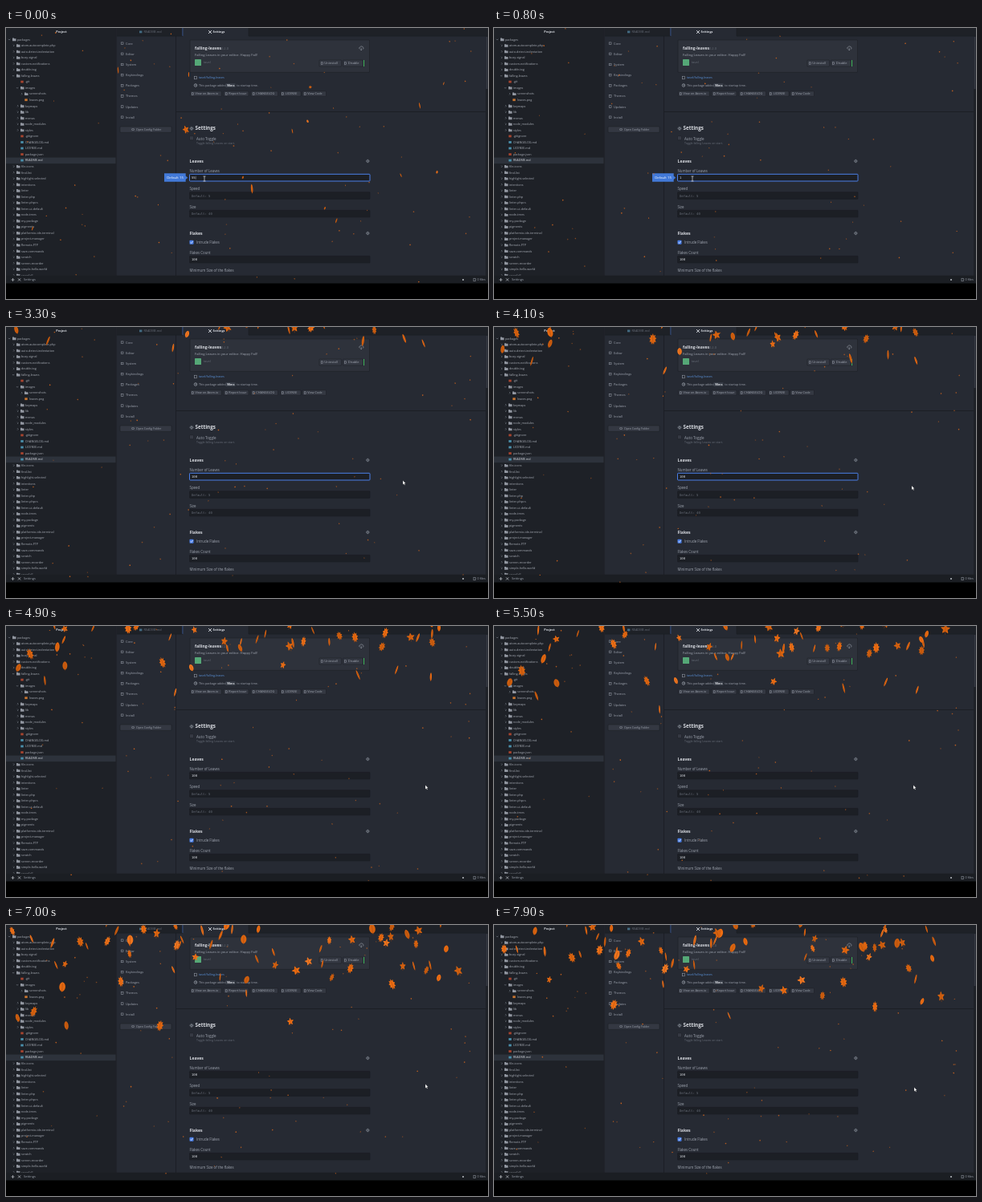
An HTML page with a canvas that plays this animation: 600 px wide and 338 px high, repeating every 8 s.

```html
<!DOCTYPE html>
<html lang="en">
<head>
<meta charset="utf-8">
<title>Falling leaves</title>
<style>
html, body { margin: 0; width: 100%; height: 100%; overflow: hidden; background: #000; }
svg, canvas { position: absolute; left: 0; top: 0; width: 600px; height: 338px; }
text { font-family: "Open Sans", "Noto Sans", sans-serif; white-space: pre; }
.mono { font-family: "DejaVu Sans Mono", monospace; }
.bold { font-weight: 700; }
</style>
</head>
<body>
<svg id="ui" viewBox="0 0 600 338"></svg>
<canvas id="fall" width="600" height="338"></canvas>
<svg id="pointer" viewBox="0 0 600 338">
  <path id="beam" d="M-1.5-3h3M0-3v6M-1.5 3h3" stroke="#d8dbe0" stroke-width=".7"/>
  <path id="arrow" d="M-1-2.5v5l1.2-1.1.9 1.8.8-.4-.9-1.8h1.5z" fill="#fff" stroke="#222" stroke-width=".2"/>
</svg>
<script>
const $ = id => document.getElementById(id);
const LOOP = 8000, FLOOR = 318.5;
const MAIN = '#262a33', SIDE = '#1e2127', EDGE = '#1a1c22', FIELD = '#1c1f25';
const TEXT = '#a0a6b1', DIM = '#686e79', BRIGHT = '#d9dce2', BLUE = '#4a7fe8';

// ---- Editor window ----
let out = '';
const rect = (x, y, w, h, fill, more = '') =>
  out += `<rect x="${x}" y="${y}" width="${w}" height="${h}" fill="${fill}" ${more}/>`;
// y is the middle of the line
const label = (x, y, s, size = 4.2, fill = TEXT, more = '') =>
  out += `<text x="${x}" y="${y + size * .36}" font-size="${size}" fill="${fill}" ${more}>${s}</text>`;
const line = (d, color = TEXT, width = .6, more = '') =>
  out += `<path d="${d}" fill="none" stroke="${color}" stroke-width="${width}" ${more}/>`;
const ring = (x, y, r, color = TEXT, more = '') =>
  out += `<circle cx="${x}" cy="${y}" r="${r}" fill="none" stroke="${color}" stroke-width=".7" ${more}/>`;
const icon = (x, y, w = 2, h = 2.4) =>
  rect(x, y - h / 2, w, h, 'none', `stroke="${TEXT}" stroke-width=".5"`);
const bold = 'class="bold"', mono = 'class="mono"';

const panel = (x, y, w, h, fill) =>
  rect(x, y, w, h, fill, `rx=".8" stroke="${EDGE}" stroke-width=".5"`);
const button = (x, y, w, h, s, size = 3.8) => {
  panel(x, y, w, h, '#343842');
  icon(x + 2.2, y + h / 2);
  label(x + 6.3, y + h / 2, s, size);
};

rect(0, 0, 600, 309, MAIN);
rect(0, 0, 136.5, 309, SIDE);
rect(136.5, 0, 1, 309, EDGE);
rect(138, 0, 462, 10, SIDE);
rect(220, 0, 82, 10, MAIN);
rect(219.5, 0, .8, 10, '#3c5c9e');
line('M138 10.2H220M302 10.2H600M302 0V10', EDGE);
label(69, 5, 'Project', 3.8, BRIGHT, `${bold} text-anchor="middle"`);
rect(166, 3.5, 3.4, 2.8, '#426b82');
label(171.5, 5, 'README.md', 3.8, DIM);
line('M252 3l4 4M256 3l-4 4', BRIGHT, .9);
label(257.5, 5, 'Settings', 3.7, BRIGHT, bold);

// Project tree: leading spaces give the depth
const tree = `packages
 atom-autocomplete-php
 auto-detect-indentation
 busy-signal
 custom-notifications
 double-tag
 falling-leaves
  .git
  images
   screenshots
   leaves.png
  keymaps
  lib
  menus
  node_modules
  styles
  .gitignore
  CHANGELOG.md
  LICENSE.md
  package.json
  README.md
 file-icons
 find-list
 highlight-selected
 intentions
 linter
 linter-php
 linter-phpcs
 linter-ui-default
 node-trees
 my-package
 pigments
 platformio-ide-terminal
 project-manager
 Remote-FTP
 save-commands
 scratch
 screen-recorder
 simple-hello-world
 snowfall`.split('\n');
const opened = ['packages', 'falling-leaves', 'images'];
const iconColor = name => /git|json/.test(name) ? '#a8452f' : /md$/.test(name) ? '#4b91ad'
  : /png/.test(name) ? '#c8752f' : '#9297a1';

rect(0, 161.5, 136.5, 7.6, '#2d323b');
tree.forEach((row, i) => {
  const name = row.trim(), x = 4 + 5 * (row.length - name.length), y = 14.3 + 7.54 * i;
  const isFile = name.includes('.'), color = iconColor(name);
  if (!isFile) line(opened.includes(name) ? `M${x - 1} ${y - .5}l1.1 1.2 1.1-1.2`
    : `M${x} ${y - 1.2}l1.2 1.2-1.2 1.2`, '#898f99', .55);
  if (isFile) rect(x + 4.3, y - 1.4, 3.4, 2.8, color);
  else out += `<path d="M${x + 4} ${y - 1.7}h1.8l.5.7h2.2v2.9h-4.5z" fill="${color}"/>`;
  label(x + 10, y, name, 3.72, name === 'README.md' ? BRIGHT : '#a9aeb7');
});

// Settings menu
['Core', 'Editor', 'System', 'Keybindings', 'Packages', 'Themes', 'Updates', 'Install'].forEach((s, i) => {
  const y = 19.2 + 13.15 * i;
  icon(143.2, y, 2.8, 2.6);
  label(149, y, s, 3.95);
});
panel(142, 123, 64, 7.3, '#343842');
icon(156.8, 126.7, 2.6, 1.8);
label(162, 126.7, 'Open Config Folder', 3.45);
line('M211.5 10V309M212 104.5H597', EDGE, .8);

// Package card
panel(229, 15, 223.5, 40.3, '#2e323b');
label(235, 25.3, 'falling-leaves', 5, BRIGHT, bold);
label(268, 25.5, '0.2.0', 4, DIM);
label(235, 33.4, 'Falling Leaves in your editor. Happy Fall!', 4.2);
rect(235, 39, 8, 8, '#55a877', 'rx=".6"');
label(246, 43, 'tavel', 3.9, DIM);
line('M440.5 26.3a1.4 1.4 0 0 1 .5-2.6a1.8 1.8 0 0 1 3.2.3a1.2 1.2 0 0 1 0 2.3M442.2 24.8v3m-1-1l1 1 1-1');
button(390, 40, 27.5, 8, 'Uninstall', 4);
button(419.5, 40, 25, 8, 'Disable', 4);
rect(445, 40, 1, 8, '#42b55c');
icon(234.5, 62, 2.8, 3.6);
label(240, 62, 'tavel/falling-leaves', 3.7, '#5a92da');
ring(236, 71.5, 1.8);
line('M236 70.3v1.4h1');
label(240, 71.6, 'This package added', 3.7);
rect(273.3, 69, 12.3, 5.3, '#373c46', 'rx=".8"');
label(275, 71.6, '98ms', 3.6, BRIGHT, bold);
label(287.3, 71.6, 'to startup time.', 3.7);
button(229.3, 78.8, 39, 6.4, 'View on Atom.io');
button(271, 78.8, 31, 6.4, 'Report Issue');
button(305, 78.8, 33.5, 6.4, 'CHANGELOG');
button(341.5, 78.8, 25.5, 6.4, 'LICENSE');
button(369, 78.8, 29.5, 6.4, 'View Code');

// Form
const section = (y, s) => {
  label(228.5, y, s, 5.1, BRIGHT, bold);
  ring(450.3, y, 1.6, '#7c828d');
  line(`M448 ${y}h4.6M450.3 ${y - 2.3}v4.6`, '#7c828d', .5);
};
const field = (y, title, value, fill = BRIGHT, id = '') => {
  label(228.5, y, title, 4.4);
  rect(228.5, y + 4.3, 224.5, 8.7, FIELD, `rx=".8" stroke="${EDGE}" stroke-width=".6" id="${id}"`);
  label(231, y + 8.7, value, 3.9, fill, `${mono} id="${id}Text"`);
};
ring(231, 125.3, 1.2);
ring(231, 125.3, 2, TEXT, 'stroke-dasharray=".8"');
label(235.5, 125.2, 'Settings', 6.3, BRIGHT, bold);
panel(228.5, 134.8, 5, 5, '#363a44');
label(237, 138, 'Auto Toggle', 4.5);
label(237, 143.5, 'Toggle falling Leaves on start.', 3.5, DIM);
section(166, 'Leaves');
field(178, 'Number of Leaves', '55', BRIGHT, 'count');
line('M236.2 184.7v4', BRIGHT, .4, 'id="caret"');
field(200.4, 'Speed', 'Default: 5', DIM);
field(223, 'Size', 'Default: 40', DIM);
section(256, 'Flakes');
rect(228.5, 264.8, 5, 5, BLUE, 'rx=".7"');
line('M229.5 267.3l1.1 1.2 2-2.5', '#fff', .7);
label(237, 267.7, 'Intrude Flakes', 4.4);
field(280, 'Flakes Count', '100');
label(228.5, 302.3, 'Minimum Size of the flakes', 4.4);

out += '<g id="tip"><path d="M197 181.3h26.7v3.2l2.5 2.3-2.5 2.3v2.6H197z" fill="#4279d8"/>';
label(200.2, 186.6, 'Default 15', 4.3, '#fff');
out += '</g>';

// Scroll strip and status bar
rect(597, 10, 3, 299, SIDE);
rect(597.6, 11, 1.8, 65, '#353a44');
rect(0, 308.7, 600, FLOOR - 308.7, '#1b1e23');
line('M6.5 314h4M8.5 312v4M15 312.3l3.2 3.2M18.2 312.3l-3.2 3.2', '#c3c7ce', .7);
label(22, 314, 'Settings', 4);
line('M568 314h2M569 313v2', BRIGHT, .8);
icon(582, 314, 2.7, 3.6);
label(586.5, 314, '0 files', 3.8);
$('ui').innerHTML = out;

// ---- Leaves and flakes ----
const ctx = $('fall').getContext('2d');
const rnd = n => { const v = Math.sin(n * 127.1 + 11.7) * 43758.5453; return v - Math.floor(v); };

// Outline with pointed lobes; the depth is how far it is cut in between them
function leafShape(width, height, lobes, depth) {
  const path = new Path2D();
  for (let a = 0; a < 2 * Math.PI; a += Math.PI / 45) {
    const r = 1 - depth * Math.abs(Math.sin(lobes * a / 2));
    path.lineTo(width * r * Math.sin(a), -height * r * Math.cos(a));
  }
  path.closePath();
  return path;
}
const slim = leafShape(2.1, 6.5, 2, .3);
const shapes = [leafShape(6.5, 6.5, 5, .5), leafShape(5, 7.5, 9, .35), leafShape(4.8, 6, 2, .2), slim, slim];

function drawLeaf(seed, x, y, scale, t) {
  ctx.save();
  ctx.translate(x, y);
  ctx.rotate(.4 * Math.sin(t * 1.3 + seed * 2.4));
  ctx.scale(scale * (.85 + .15 * Math.sin(t * 1.7 + seed)), scale);
  ctx.fillStyle = `hsl(25 87% ${42 + 12 * rnd(seed + 50)}%)`;
  ctx.fill(shapes[Math.floor(rnd(seed + 90) * shapes.length)]);
  ctx.strokeStyle = '#a9480f';
  ctx.lineWidth = .5;
  ctx.beginPath();
  ctx.moveTo(0, -4);
  ctx.lineTo(0, 7);
  ctx.stroke();
  ctx.restore();
}

function drawFlake(i, t) {
  const x = 12 + 570 * rnd(i) + 4 * Math.sin(t + i);
  const y = (rnd(i + 200) * FLOOR + (14 + 16 * rnd(i + 400)) * t) % FLOOR;
  ctx.globalAlpha = .4 + .5 * rnd(i + 300);
  ctx.fillStyle = '#d8691f';
  ctx.beginPath();
  ctx.ellipse(x, y, .5 + .4 * rnd(i + 500), .8, i, 0, 7);
  ctx.fill();
  ctx.globalAlpha = 1;
}

// A few small leaves are in the air until the number is cleared;
// then a new one starts at the top every GAP seconds and falls for LIFE seconds
const CLEARED = .6, FIRST = 2.4, GAP = .06, LIFE = 4;

function drawFall(t) {
  ctx.clearRect(0, 0, 600, 338);
  ctx.save();
  ctx.beginPath();
  ctx.rect(0, 0, 600, FLOOR);
  ctx.clip();
  for (let i = 0; i < 75; i++) drawFlake(i, t);
  if (t < CLEARED) for (let i = 0; i < 15; i++)
    drawLeaf(i, 15 + 560 * rnd(i + 600), 40 + 240 * rnd(i + 700) + 25 * t, .3 + .6 * rnd(i + 800) ** 2, t);
  for (let i = 0; FIRST + GAP * i < t; i++) {
    const age = t - FIRST - GAP * i;
    if (age > LIFE) continue;
    const x = 8 + 555 * rnd(i + 1000) + 5 * Math.sin(t * 1.6 + i);
    const y = -4 + (11 + 28 * rnd(i + 1200) ** 2) * age;
    drawLeaf(i, x, y, .7 + .3 * rnd(i + 1400), t);
  }
  ctx.restore();
}

// ---- Typing and pointer ----
const ease = (ms, from, to) => {
  const p = Math.min(1, Math.max(0, (ms - from) / (to - from)));
  return p * p * (3 - 2 * p);
};
const show = (id, on) => $(id).setAttribute('visibility', on ? 'visible' : 'hidden');

const start = performance.now();
function frame() {
  const ms = Math.max(0, performance.now() - start) % LOOP;
  const away = ease(ms, 2400, 3000), click = ease(ms, 3600, 4200), rest = ease(ms, 7200, 7800);
  const x = 247 + 248 * away + 28 * click + rest, y = 188 + 6 * away + 7 * click + 4 * rest;
  const over = x < 453, focused = ms < 4300;
  $('countText').textContent = ms < 600 ? '55' : '100'.slice(0, Math.floor((ms - 600) / 200));
  $('count').setAttribute('stroke', focused ? BLUE : EDGE);
  $('count').setAttribute('stroke-width', focused ? 1 : .6);
  show('caret', ms < 500);
  show('tip', over);
  show('beam', over);
  show('arrow', !over);
  for (const id of ['beam', 'arrow']) $(id).setAttribute('transform', `translate(${x} ${y})`);
  drawFall(ms / 1000);
  requestAnimationFrame(frame);
}
frame();
</script>
</body>
</html>
```
